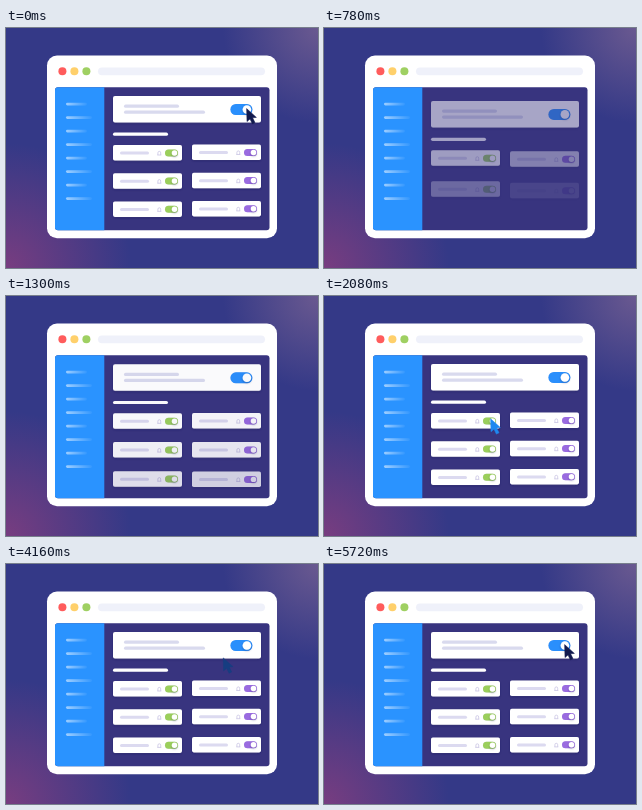
Animation, 312 px wide and 240 px high, one loop 6.24 s. Source, as an HTML page:

```html
<!DOCTYPE html>
<html lang="en">
<head>
<meta charset="utf-8">
<title>Settings panel</title>
<style>
html, body { margin: 0; width: 100%; height: 100%; overflow: hidden; background: #343987; }
svg { display: block; width: 100vw; height: 100vh; }
</style>
</head>
<body>
<svg id="stage" viewBox="0 0 312 240"></svg>
<script>
const LOOP = 6240, START = 520;
const stage = document.getElementById('stage');

const bar = (x, y, w, h, fill, r = h / 2, extra = '') =>
  `<rect x="${x}" y="${y}" width="${w}" height="${h}" rx="${r}" fill="${fill}" ${extra}/>`;
const glow = (id, x, y, r, color) =>
  `<radialGradient id="${id}" gradientUnits="userSpaceOnUse" cx="${x}" cy="${y}" r="${r}">
    <stop stop-color="${color}"/><stop offset="1" stop-color="${color}" stop-opacity="0"/></radialGradient>`;

// A switch in its "on" position; the knob and tint are moved later.
const toggle = (id, x, y, w, h, color) => `<g id="${id}">
  ${bar(x, y, w, h, '#d9dcec')}${bar(x, y, w, h, color, h / 2, 'class="tint"')}
  <circle class="knob" cx="${x + w - h / 2}" cy="${y + h / 2}" r="${h * .39}" fill="#fff" filter="url(#soft)"/></g>`;

const items = [];
const item = (delay, content) => {
  items.push(delay);
  return `<g class="item">${content}</g>`;
};

const smallCard = (row, right) => {
  const x = right ? 186 : 107, y = 117 + row * 28.2 - (right ? .5 : 0);
  return item(25 + row * 130 + (right ? 75 : 0),
    bar(x, y, 69, 15.5, '#fff', 1.8, 'filter="url(#soft)"') +
    bar(x + 7, y + 6.5, 29, 3, '#dcdaf0') +
    `<path d="M${x + 44.3} ${y + 10}h4m-3.4 0v-2.2a1.4 1.4 0 0 1 2.8 0v2.2" fill="none" stroke="#c9c5e4" stroke-width=".8"/>` +
    toggle(`switch${row}${right}`, x + 52, y + 4.4, 13, 7, right ? '#9a6be0' : '#9bcf5b'));
};

stage.innerHTML = `
<defs>
  ${glow('pink', 0, 240, 125, '#783d80')}${glow('grey', 312, 0, 95, '#6a5990')}
  <linearGradient id="fade"><stop stop-color="#fff" stop-opacity=".55"/><stop offset="1" stop-color="#fff" stop-opacity=".05"/></linearGradient>
  <filter id="soft" x="-30%" y="-30%" width="160%" height="180%">
    <feDropShadow dx="0" dy="1" stdDeviation=".8" flood-color="#1c1850" flood-opacity=".35"/></filter>
  <clipPath id="screen">${bar(49, 59.3, 214.5, 143, '#fff', 3)}</clipPath>
</defs>
<rect width="312" height="240" fill="#343987"/>
<rect width="312" height="240" fill="url(#pink)"/>
<rect width="312" height="240" fill="url(#grey)"/>
${bar(41, 27.5, 230, 182.7, '#fff', 10)}
${['#ff5c5c', '#ffd06b', '#9fd062'].map((c, i) => `<circle cx="${56.4 + i * 12}" cy="43.3" r="4" fill="${c}"/>`).join('')}
${bar(92, 39.4, 167, 7.8, '#eff1fa')}
<g clip-path="url(#screen)">
  <rect x="49" y="59" width="215" height="144" fill="#38347f"/>
  <rect x="49" y="59" width="49.3" height="144" fill="#2a93ff"/>
  ${[...Array(8)].map((_, i) => bar(60, 74.7 + i * 13.5, i % 2 ? 26 : 21, 2.8, 'url(#fade)')).join('')}
  ${item(0, bar(107, 68, 148, 26.5, '#fff', 2, 'filter="url(#soft)"') +
    bar(118, 76.6, 55, 3.2, '#d9daee') + bar(118, 82.6, 81, 3.2, '#d9daee') +
    toggle('mainSwitch', 224.4, 76, 22, 11, '#2a8ffc'))}
  ${item(12, bar(107, 104.6, 55, 3.2, '#fff'))}
  ${[0, 1, 2].map(r => smallCard(r, 0) + smallCard(r, 1)).join('')}
</g>
<path id="cursor" d="M0 0 9.8 8.8 6 9.2 8.4 14 5.8 15.3 3.4 10.4 .4 13Z" stroke-linejoin="round" stroke-width=".5"/>`;

const groups = stage.querySelectorAll('.item');
const cursor = document.getElementById('cursor');
const progress = (t, from, to) => Math.min(1, Math.max(0, (t - from) / (to - from)));
const easeOut = p => 1 - (1 - p) ** 3;
const easeInOut = p => p < .5 ? 4 * p ** 3 : 1 - 4 * (1 - p) ** 3;
const ramp = (t, from, to) => easeInOut(progress(t, from, to));
const pulse = (t, from, to) => Math.sin(Math.PI * progress(t, from, to));
const mix = (a, b, p) => a + (b - a) * p;

function setSwitch(id, on, travel) {
  const el = document.getElementById(id);
  el.querySelector('.tint').setAttribute('opacity', on);
  el.querySelector('.knob').setAttribute('transform', `translate(${-travel * (1 - on)})`);
}

function draw(time) {
  let t = time % LOOP;
  if (t < START) t += LOOP;

  groups.forEach((g, i) => {
    const shown = easeOut(progress(t, START + items[i], START + items[i] + 1100));
    g.setAttribute('opacity', shown);
    g.setAttribute('transform', `translate(0 ${11 * (1 - shown)})`);
  });

  setSwitch('switch00', 1 - ramp(t, 2650, 2990) + ramp(t, 3250, 3520), 6);
  setSwitch('mainSwitch', 1 - ramp(t, 4620, 5070) + ramp(t, 5260, 5720), 11);

  const enter = easeOut(progress(t, 1700, 2080));
  const move = ramp(t, 3470, 4680);
  const press = pulse(t, 2650, 2990) + pulse(t, 4640, 5000);
  const x = mix(166.6, 240.6, move) + 8 * (1 - enter);
  const y = mix(122.8, 80.6, move) + 10 * (1 - enter);
  const color = `rgb(${mix(30, 18, move)},${mix(136, 26, move)},${mix(240, 78, move)})`;
  cursor.setAttribute('transform', `translate(${x} ${y}) scale(${1 - .08 * press})`);
  cursor.setAttribute('opacity', enter);
  cursor.setAttribute('fill', color);
  cursor.setAttribute('stroke', color);
}

const begin = performance.now();
function tick() {
  draw(performance.now() - begin);
  requestAnimationFrame(tick);
}
tick();
</script>
</body>
</html>
```
